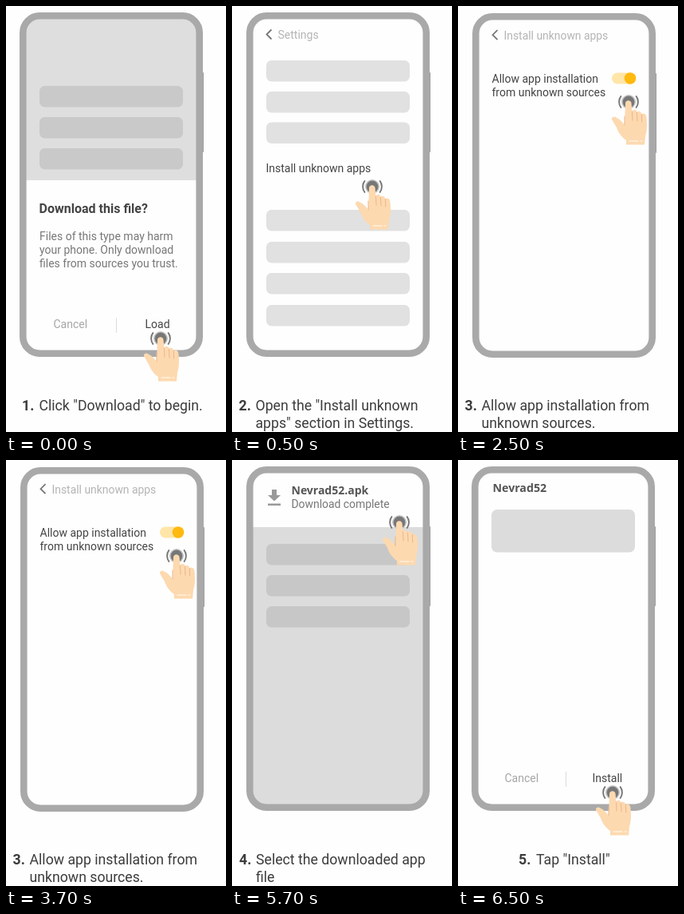
Recreate the animation shown at these times as an HTML page. Size 276 by 533 pixels, loop 8000 ms.

```html
<!DOCTYPE html>
<html lang="en">
<head>
<meta charset="utf-8">
<title>Install steps</title>
<style>
  html, body { margin: 0; width: 100%; height: 100%; overflow: hidden; background: #fefefe; }
  svg { display: block; width: 100vw; height: 100vh; }
  text { font-family: Roboto, Arial, sans-serif; font-size: 14px; fill: #444; white-space: pre; }
  .bold { font-weight: 700; }
  .app { font-family: "Open Sans", "Noto Sans", sans-serif; font-weight: 700; fill: #555; }
  .caption { font-size: 17.7px; fill: #3c3c3c; }
  .muted { fill: #777; }
  .faint { fill: #a6a6a6; }
  .pale { fill: #b4b4b4; }
</style>
</head>
<body>
<svg id="stage" viewBox="0 0 276 533" xmlns="http://www.w3.org/2000/svg">
  <defs>
    <clipPath id="screen"><rect x="22" y="13" width="220" height="421" rx="20"/></clipPath>
    <g id="frame">
      <rect x="245" y="83" width="3" height="100" rx="1" fill="#a0a0a0"/>
      <rect x="21.3" y="12.3" width="221.4" height="422.4" rx="21" fill="none" stroke="#a9a9a9" stroke-width="8.6"/>
    </g>
    <g id="hand">
      <circle r="9" fill="#c4c4c4"/>
      <circle r="7.4" fill="#777"/>
      <path d="M-9.2 -7.6A12 12 0 0 0 -9.2 7.6M9.2 -7.6A12 12 0 0 1 9.2 7.6"
            fill="none" stroke="#777" stroke-width="1.9"/>
      <path d="M-4 2C-4 -3 3.4 -3 3.6 2L4.4 12C6 8.5 10 9 10.4 13C12 10.5 16 11.5 16.4 15.5
               C18 13.5 22 14.5 22.4 19C23.4 28 23.4 35 21 43L20 53.5H-3V48C-9 44 -13 38 -15 32
               L-21 22C-21.5 18.500 -18 17.500 -15.500 19.500C-11 21.500 -8 25 -5 29Z" fill="#fdd9b0"/>
      <path d="M4.400 12L5 23M10.400 13L11 24M16.400 15.500L16.600 25M-5 18V29"
            fill="none" stroke="#edb98e" stroke-width="1.100" stroke-linecap="round"/>
      <path d="M1 49H12M15 49H17" stroke="#fff0dc" stroke-width="1.300" stroke-linecap="round"/>
    </g>
    <path id="back" d="M49.5 29.500L43.500 35.500L49.500 41.500" fill="none" stroke="#777" stroke-width="1.800"/>
  </defs>
</svg>
<script>
const stage = document.getElementById("stage");
const LOOP = 8000;
const APP = "Nevrad52";

const rect = (x, y, w, h, fill, r = 0) =>
  `<rect x="${x}" y="${y}" width="${w}" height="${h}" rx="${r}" fill="${fill}"/>`;
const text = (x, y, str, cls = "", size = 14) =>
  `<text x="${x}" y="${y}" class="${cls}" style="font-size:${size}px">${str}</text>`;
const use = (id, x = 0, y = 0) => `<use href="#${id}" x="${x}" y="${y}"/>`;
const bars = (x, tops, fill) => tops.map(y => rect(x, y, 180, 26.5, fill, 6.5)).join("");
const shade = (y, h, fill) => `<g clip-path="url(#screen)">${rect(20, y, 225, h, fill)}</g>`;
const caption = (n, x, textX, lines) =>
  text(x, 506, n + ".", "caption bold", 17.7) +
  lines.map((line, i) => text(textX, 506 + i * 21.5, line, "caption", 17.7)).join("");
const buttons = (cancelX, lineX, okX, ok) =>
  text(cancelX, 403, "Cancel", "faint") +
  rect(lineX, 390, 1, 19, "#dcdcdc") +
  text(okX, 403, ok);

const steps = [
  { start: 0, dx: 0, dy: 0, tap: [194, 416],
    body: shade(12, 206, "#dedede") +
      bars(42, [100, 139, 178], "#c9c9c9") +
      text(41.5, 259, "Download this file?", "bold", 16) +
      ["Files of this type may harm", "your phone. Only download", "files from sources you trust."]
        .map((line, i) => text(42, 293 + i * 17, line, "muted")).join("") +
      buttons(59.5, 138, 174.5, "Load"),
    note: caption(1, 20, 41.5, ['Click "Download" to begin.']) },

  { start: 500, dx: 1, dy: 0, tap: [176, 226],
    body: use("back") + text(57.5, 41, "Settings", "pale") +
      bars(43, [68, 107, 145.5, 255, 295, 334, 374], "#e1e1e1") +
      text(42.5, 208, "Install unknown apps"),
    note: caption(2, 8.5, 29.5, ['Open the "Install unknown', 'apps" section in Settings.']) },

  { start: 2500, dx: 1, dy: 1, tap: [214, 120],
    body: use("back", 0, 0.7) + text(57.5, 42, "Install unknown apps", "pale", 13.9) +
      text(42.5, 96, "Allow app installation") +
      text(42.5, 113, "from unknown sources") +
      rect(193, 83.500, 30, 14, "#ffe6a8", 7) +
      `<circle cx="216" cy="90.500" r="7.300" fill="#ffb90f"/>`,
    note: caption(3, 8.5, 29.5, ["Allow app installation from", "unknown sources."]) },

  { start: 4500, dx: 1, dy: 0, tap: [210, 78],
    body: shade(84, 355, "#dcdcdc") +
      bars(43, [105, 144, 183], "#c7c7c7") +
      `<path d="M50 37H56V44H61L53 51.500L45 44H50ZM45 54.500H61V57H45Z" fill="#999"/>` +
      text(74.5, 43, APP + ".apk", "app") +
      text(74.5, 60, "Download complete", "muted", 13.9),
    note: caption(4, 9, 30, ["Select the downloaded app", "file"]) },

  { start: 6500, dx: 0, dy: 0, tap: [194, 416],
    body: text(43.5, 40, APP, "app", 14.2) +
      rect(42, 62, 180, 53.5, "#dcdcdc", 7) +
      buttons(58.5, 135, 168.5, "Install"),
    note: caption(5, 76, 98, ['Tap "Install"']) }
];

for (const s of steps) {
  s.node = document.createElementNS("http://www.w3.org/2000/svg", "g");
  s.node.innerHTML = s.body + use("frame", s.dx, s.dy) + use("hand", ...s.tap) + s.note;
  stage.appendChild(s.node);
}

function draw(time) {
  const t = time % LOOP;
  const current = steps.findLast(s => t >= s.start);
  for (const s of steps) s.node.style.display = s === current ? "" : "none";
}

const origin = performance.now();
function tick() {
  draw(performance.now() - origin);
  requestAnimationFrame(tick);
}
tick();
</script>
</body>
</html>
```
